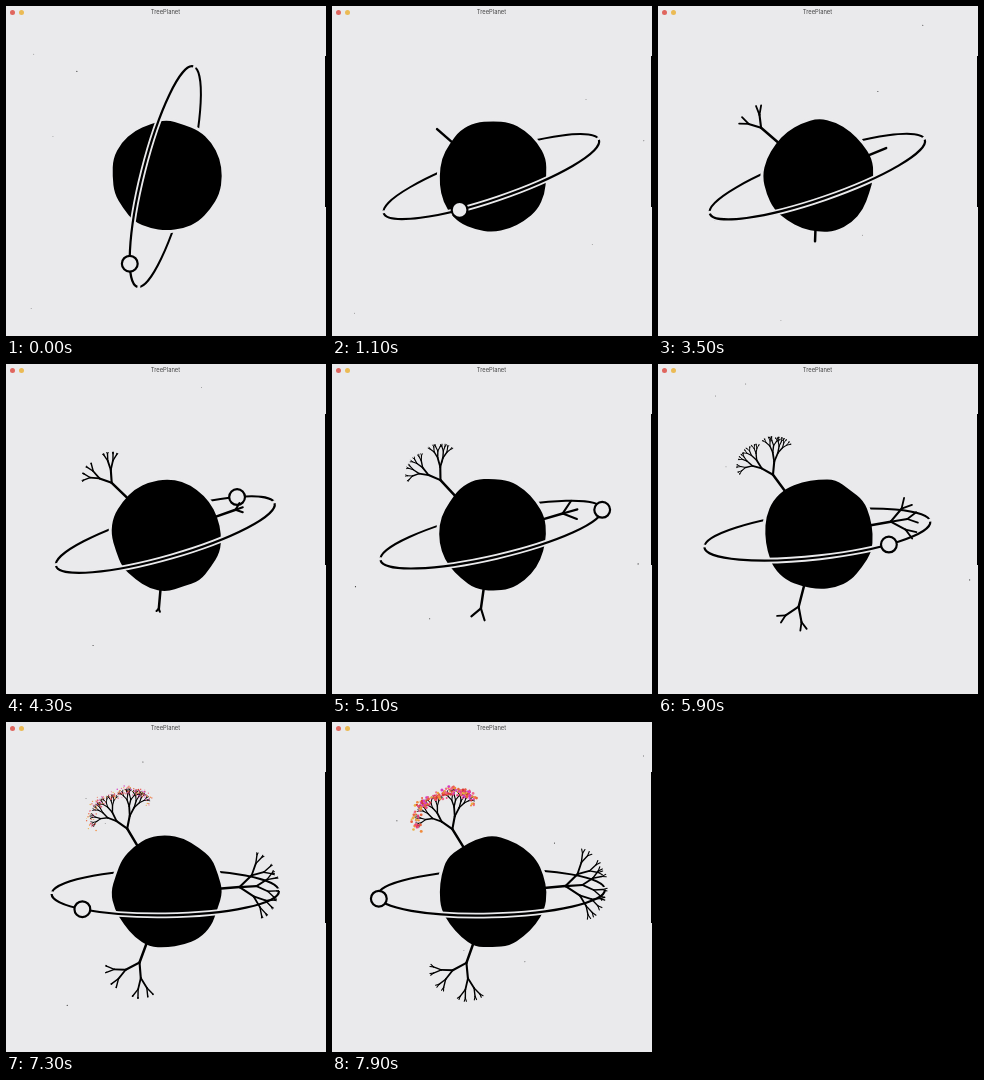
Recreate the animation shown at these times as an HTML page with a canvas. Size 320 by 330 pixels, loop 8 s.

```html
<!DOCTYPE html>
<html lang="en">
<head>
<meta charset="utf-8">
<title>TreePlanet</title>
<style>
  html, body { margin: 0; width: 100%; height: 100%; overflow: hidden; background: #eaeaec; }
  canvas { position: absolute; left: 0; top: 0; width: 320px; height: 330px; }
  .title {
    position: absolute; left: 0; top: 2px; width: 319px;
    font: 5.8px/8px Inter, Roboto, sans-serif; color: #444; text-align: center;
  }
  .dot { position: absolute; top: 3.5px; width: 5px; height: 5px; border-radius: 50%; }
  .close { left: 3.5px; background: #e0665e; }
  .min { left: 12.5px; background: #ebbb55; }
  .scroll { position: absolute; left: 319px; top: 50px; width: 1px; height: 151px; background: #000; }
</style>
</head>
<body>
<canvas></canvas>
<div class="dot close"></div>
<div class="dot min"></div>
<div class="title">TreePlanet</div>
<div class="scroll"></div>
<script>
const LOOP = 8000, STEP = 100;
const BG = '#eaeaec', INK = '#000';
const CX = 159.3, CY = 170.6, RX = 113.7, RY = 22.8;
const PETALS = ['#e9457f', '#d63cc0', '#f08a3c', '#d8363e', '#e9b045', '#f06a8c', '#e8603c'];
const ROOT = 50;
const LENGTHS = [24.5, 13, 9.5, 7, 5, 3.5, 2.5];
const WIDTHS = [2.5, 2.1, 1.8, 1.4, 1.1, 0.9, 0.8];

// [ms, value] keys
const SPIN = [[0, 104.2], [1100, -18.8], [2100, -21], [3500, -19], [5100, -13], [6700, 0], [7900, -1.5]];
const ORBIT = [[0, 35], [1100, 111], [2100, 183], [5100, 362], [6700, 462], [7900, 532]];

const canvas = document.querySelector('canvas');
const ctx = canvas.getContext('2d');
const dpr = window.devicePixelRatio || 1;
canvas.width = 320 * dpr;
canvas.height = 330 * dpr;

const rad = deg => deg * Math.PI / 180;
const clamp = x => Math.max(0, Math.min(1, x));
const linear = x => x;
const smooth = x => x * x * (3 - 2 * x);

function random(seed) {
  let s = seed * 7919 + 17;
  return () => {
    s = (s + 0x6D2B79F5) | 0;
    let n = Math.imul(s ^ (s >>> 15), 1 | s);
    n = (n + Math.imul(n ^ (n >>> 7), 61 | n)) ^ n;
    return ((n ^ (n >>> 14)) >>> 0) / 4294967296;
  };
}

function at(keys, t, ease = linear) {
  if (t <= keys[0][0]) return keys[0][1];
  for (let i = 1; i < keys.length; i++) {
    const [t0, a] = keys[i - 1], [t1, b] = keys[i];
    if (t <= t1) return a + (b - a) * ease((t - t0) / (t1 - t0));
  }
  return keys[keys.length - 1][1];
}

// A branch holds its turn from the parent, its length, its children and any petals.
function branch(rnd, turn, depth, levels, size, fork) {
  const len = LENGTHS[depth] * (depth ? size : 1);
  const node = { turn, depth, len, kids: [], petals: [] };
  if (depth + 1 < levels) {
    const turns = fork || [-20, 22].map(a => a + (rnd() - 0.5) * 18);
    node.kids = turns.map(a => branch(rnd, a, depth + 1, levels, size));
  } else {
    for (let i = 0; i < 3; i++) {
      node.petals.push({
        x: (rnd() - 0.5) * 8, y: (rnd() - 0.4) * 8, r: 0.8 + rnd() * 0.7,
        color: PETALS[Math.floor(rnd() * PETALS.length)]
      });
    }
  }
  return node;
}

const trees = [
  {
    root: branch(random(3), -120, 0, 7, 1, [-24, 42]),
    growth: [[800, 0], [1100, 0.9], [2100, 2], [3500, 3], [5100, 5.6], [6700, 7], [7900, 8]]
  },
  {
    root: branch(random(8), -3.5, 0, 5, 1.3, [-40, 1, 38]),
    growth: [[3000, 0], [3500, 1], [5100, 1.9], [6700, 3.9], [7900, 4.7]]
  },
  {
    root: branch(random(5), 111, 0, 5, 1.2, [-25, 42]),
    growth: [[3200, 0], [3500, 0.6], [5100, 1.8], [6700, 3.7], [7900, 4.6]]
  }
];

function stroke(color, width, cap = 'butt') {
  ctx.strokeStyle = color;
  ctx.lineWidth = width;
  ctx.lineCap = cap;
  ctx.stroke();
}

function disc(x, y, r, color) {
  ctx.beginPath();
  ctx.arc(x, y, r, 0, 7);
  ctx.fillStyle = color;
  ctx.fill();
}

function drawBranch(node, x, y, heading, grown, blooms) {
  const part = clamp(grown - node.depth);
  if (!part) return;
  const dir = heading + node.turn;
  const x2 = x + Math.cos(rad(dir)) * node.len * part;
  const y2 = y + Math.sin(rad(dir)) * node.len * part;
  ctx.beginPath();
  ctx.moveTo(x, y);
  ctx.lineTo(x2, y2);
  stroke(INK, WIDTHS[node.depth], 'round');
  for (const kid of node.kids) drawBranch(kid, x2, y2, dir, grown, blooms);
  for (const p of node.petals) blooms.push([x2 + p.x, y2 + p.y, p.r, p.color]);
}

function drawTree({ root, growth }, t, spin) {
  const grown = at(growth, t), a = rad(root.turn + spin), blooms = [];
  if (!grown) return;
  drawBranch(root, CX + Math.cos(a) * ROOT, CY + Math.sin(a) * ROOT, spin, Math.min(grown, 7), blooms);
  const open = clamp(grown - 7);
  if (open) for (const [x, y, r, color] of blooms) disc(x, y, r * open, color);
}

function planetPath(rnd) {
  const n = 20, pts = [];
  for (let i = 0; i < n; i++) {
    const a = i / n * 2 * Math.PI, r = 56.2 + (rnd() - 0.5) * 3.6;
    pts.push([160.5 + Math.cos(a) * r * 0.975, 170.2 + Math.sin(a) * r]);
  }
  const mid = (p, q) => [(p[0] + q[0]) / 2, (p[1] + q[1]) / 2];
  ctx.beginPath();
  ctx.moveTo(...mid(pts[n - 1], pts[0]));
  pts.forEach((p, i) => ctx.quadraticCurveTo(...p, ...mid(p, pts[(i + 1) % n])));
  ctx.closePath();
}

function ringPath(spin, from, to) {
  ctx.beginPath();
  ctx.ellipse(CX, CY, RX, RY, rad(spin), rad(from), rad(to));
}

function drawMoon(spin, orbit) {
  const s = rad(spin), u = RX * Math.cos(rad(orbit)), v = RY * Math.sin(rad(orbit));
  disc(CX + u * Math.cos(s) - v * Math.sin(s), CY + u * Math.sin(s) + v * Math.cos(s), 7.9, BG);
  stroke(INK, 2.2);
}

function draw(t) {
  const rnd = random(t / STEP + 1);
  const spin = at(SPIN, t, smooth), orbit = at(ORBIT, t);
  const inFront = Math.sin(rad(orbit)) > 0;

  ctx.setTransform(dpr, 0, 0, dpr, 0, 0);
  ctx.fillStyle = BG;
  ctx.fillRect(0, 0, 320, 330);

  for (let i = 0; i < 5; i++) disc(8 + rnd() * 304, 14 + rnd() * 310, 0.35 + rnd() * 0.3, '#333');

  ringPath(spin, 180, 360);
  stroke(INK, 2);
  if (!inFront) drawMoon(spin, orbit);

  planetPath(rnd);
  stroke(BG, 6);
  ctx.fillStyle = INK;
  ctx.fill();

  ringPath(spin, 0, 180);
  stroke(BG, 5.8, 'round');
  stroke(INK, 2.2);

  for (const tree of trees) drawTree(tree, t, spin);
  if (inFront) drawMoon(spin, orbit);
}

const start = performance.now();
let shown = -1;
function tick() {
  const t = Math.floor((performance.now() - start) % LOOP / STEP) * STEP;
  if (t !== shown) draw(shown = t);
  requestAnimationFrame(tick);
}
tick();
</script>
</body>
</html>
```
